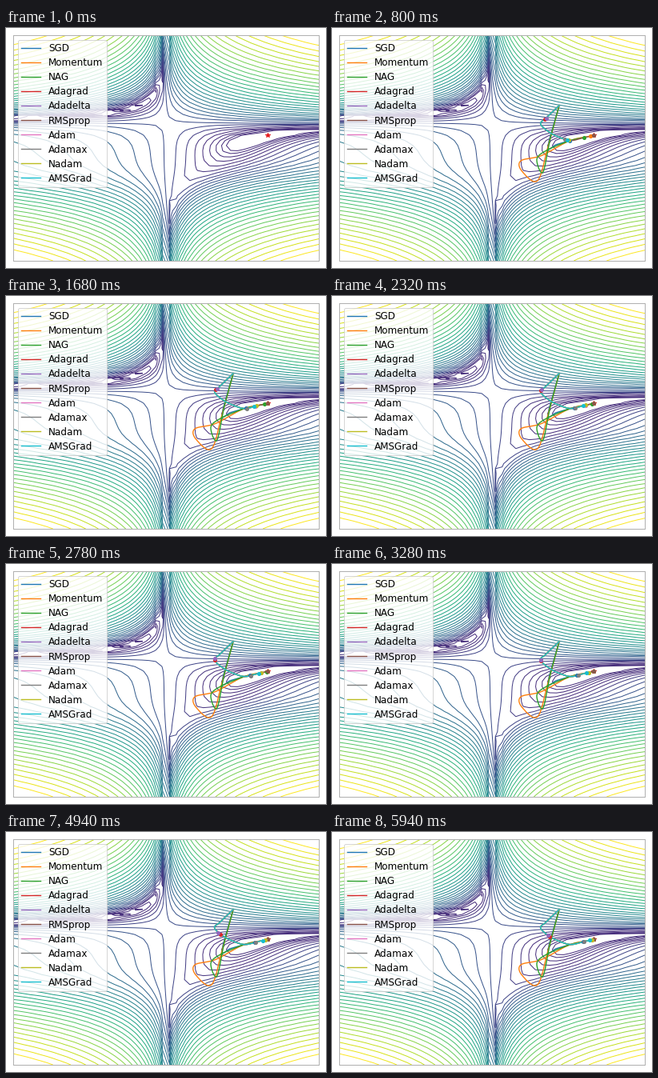
Animation, 400 px wide and 300 px high, one loop 6 s. Source, as a matplotlib script:

```python
import numpy as np
import matplotlib.pyplot as plt
from matplotlib.animation import FuncAnimation
from matplotlib.colors import ListedColormap, LogNorm

plt.rcParams.update({"font.family": "DejaVu Sans", "font.size": 12})

W, H, DPI, MARGIN = 400, 300, 72, 9
FRAMES, INTERVAL = 300, 20
SUB = 4  # path samples per frame
LIMIT = 4.5


def beale(x, y):
    return ((1.5 - x + x * y) ** 2
            + (2.25 - x + x * y ** 2) ** 2
            + (2.625 - x + x * y ** 3) ** 2)


def spline(points, u):
    """Catmull-Rom curve through evenly spaced points, as rows x and y."""
    p = np.array(points)
    m = np.gradient(p, axis=0)
    i = np.clip(u.astype(int), 0, len(p) - 2)
    s = (u - i)[:, None]
    pos = (p[i] * (1 + 2 * s) * (1 - s) ** 2 + m[i] * s * (1 - s) ** 2
           + p[i + 1] * s ** 2 * (3 - 2 * s) + m[i + 1] * s ** 2 * (s - 1))
    return pos.T


# Routes over the surface, from the common start to the minimum
START, GOAL = (1.98, 1.7), (3.0, 0.5)
VALLEY = [(2.29, 0.29), (2.69, 0.41), GOAL]
PLAIN = [START, (1.65, 0.06), (1.9, 0.14)] + VALLEY
HEAVY = [START, (1.65, 0.06), (1.34, -1.31), (0.88, -0.92),
         (0.85, -0.51), (1.46, -0.30)] + VALLEY[::2]
NESTEROV = [START, (1.72, 0.4), (1.5, -0.97), (1.32, -0.45),
            (1.6, -0.1)] + VALLEY
ADAPTIVE = [START, (1.60, 1.2), (1.43, 0.96), (1.70, 0.62),
            (2.07, 0.38), (2.36, 0.30)] + VALLEY[1:]

# name: route, share of it covered slowly, fast and slow decay in frames
OPTIMIZERS = {
    "SGD": (PLAIN, 0.45, 6, 385),
    "Momentum": (HEAVY, 0, 10, 1),
    "NAG": (NESTEROV, 0.3, 9, 45),
    "Adagrad": (ADAPTIVE, 0.88, 8, 680),
    "Adadelta": (ADAPTIVE, 0.9, 10, 720),
    "RMSprop": (ADAPTIVE, 0, 8, 1),
    "Adam": (ADAPTIVE, 0.3, 24, 115),
    "Adamax": (ADAPTIVE, 0.34, 20, 330),
    "Nadam": (ADAPTIVE, 0.3, 22, 110),
    "AMSGrad": (ADAPTIVE, 0.24, 25, 200),
}


def trajectory(route, share, fast, slow):
    t = np.arange(FRAMES * SUB) / SUB
    left = (1 - share) * np.exp(-t / fast) + share * np.exp(-t / slow)
    return spline(route, (len(route) - 1) * (1 - left))


fig = plt.figure(figsize=(W / DPI, H / DPI), dpi=DPI, facecolor="white")
ax = fig.add_axes([MARGIN / W, MARGIN / H,
                   1 - 2 * MARGIN / W, 1 - 2 * MARGIN / H])
ax.set(xlim=(-LIMIT, LIMIT), ylim=(-LIMIT, LIMIT), xticks=[], yticks=[])
for spine in ax.spines.values():
    spine.set(color="#b0b0b0", linewidth=1)

# Viridis with its darkest purples held at indigo
cmap = ListedColormap(plt.cm.viridis(np.linspace(0, 1, 256).clip(0.13)))
axis = np.linspace(-LIMIT, LIMIT, 46)
gx, gy = np.meshgrid(axis, axis)
ax.contour(gx, gy, beale(gx, gy), levels=np.logspace(0, 5, 35),
           norm=LogNorm(), cmap=cmap, linewidths=1)
ax.plot(*GOAL, "*", color="#e41a1c", markersize=6)

paths = [trajectory(*spec) for spec in OPTIMIZERS.values()]
lines = [ax.plot([], [], lw=1.4, color=f"C{i}", label=name)[0]
         for i, name in enumerate(OPTIMIZERS)]
dots = [ax.plot([], [], "o", ms=4, color=line.get_color())[0] for line in lines]
ax.legend(loc="upper left", labelspacing=0.42, borderpad=0.36)


def update(frame):
    end = max((frame - 1) * SUB + 1, 0)
    for path, line, dot in zip(paths, lines, dots):
        line.set_data(path[:, :end])
        dot.set_data(path[:, max(end - 1, 0):end])
    return lines + dots


anim = FuncAnimation(fig, update, frames=FRAMES, interval=INTERVAL,
                     init_func=lambda: update(0), repeat=True, repeat_delay=0)
plt.show()
```
